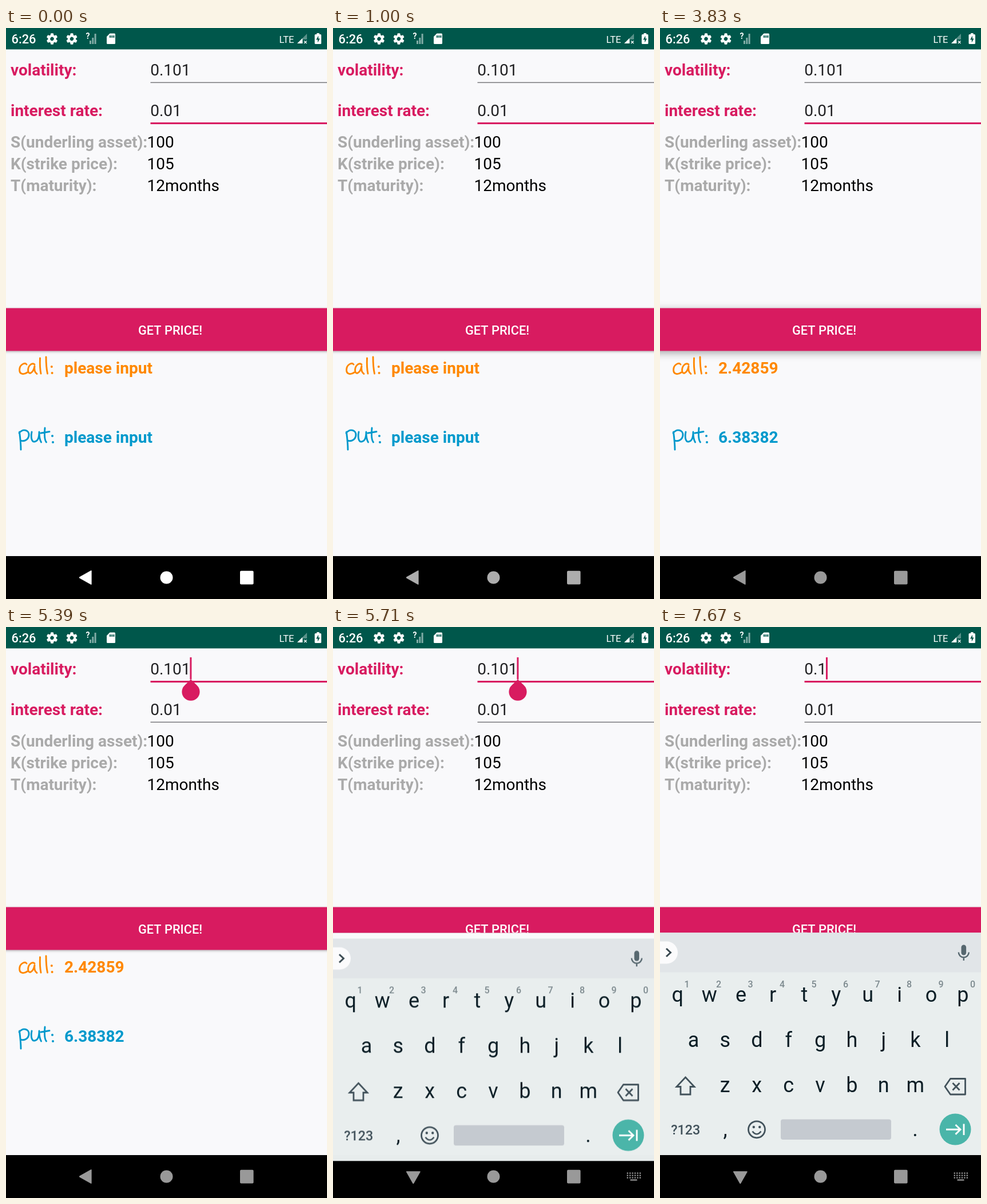
An HTML page with a canvas for the animation above (8 s loop, 561 by 998 pixels).

```html
<!DOCTYPE html>
<html lang="en">
<head>
<meta charset="utf-8">
<title>Option pricer</title>
<style>
html, body { margin: 0; width: 100%; height: 100%; overflow: hidden; background: #000; }
canvas { display: block; }
</style>
</head>
<body>
<canvas id="stage" width="561" height="998"></canvas>
<script>
const W = 561, H = 998, LOOP = 8000, NAV_Y = 923, FIT_Y = 534.5;
const PINK = '#d81b60', BG = '#f9f9fb', INK = '#0c1e26', ICON = '#42525b';
const screen = document.getElementById('stage').getContext('2d');
let g = screen;

const clamp = v => Math.min(1, Math.max(0, v));
const ramp = (t, a, b) => clamp((t - a) / (b - a));
const smooth = u => (1 - Math.cos(Math.PI * u)) / 2;
const within = (t, spans) => spans.some(([a, b]) => t >= a && t < b);

function rect(x, y, w, h, color) {
  g.fillStyle = color;
  g.fillRect(x, y, w, h);
}
function round(x, y, w, h, r, color) {
  g.fillStyle = color;
  g.beginPath();
  g.roundRect(x, y, w, h, r);
  g.fill();
}
function disc(x, y, r, color) {
  g.fillStyle = color;
  g.beginPath();
  g.arc(x, y, r, 0, 7);
  g.fill();
}
function text(str, x, y, size, color, weight = 400, align = 'left') {
  g.font = `${weight} ${size}px Roboto, sans-serif`;
  g.textAlign = align;
  g.fillStyle = color;
  g.fillText(str, x, y);
}
function fill(path, color) {
  g.fillStyle = color;
  g.fill(new Path2D(path), 'evenodd');
}
function stroke(path, color, width, cap = 'butt') {
  g.strokeStyle = color;
  g.lineWidth = width;
  g.lineCap = cap;
  g.lineJoin = cap === 'round' ? 'round' : 'miter';
  g.stroke(new Path2D(path));
}

function gear(cx, cy) {
  g.save();
  g.translate(cx, cy);
  g.fillStyle = '#fff';
  g.beginPath();
  g.arc(0, 0, 7, 0, 7);
  g.arc(0, 0, 3.2, 7, 0, true);
  g.fill();
  for (let i = 0; i < 6; i++) {
    g.rotate(Math.PI / 3);
    fill('M-3.2 -5.5L-2.1 -9.7H2.1L3.2 -5.5Z', '#fff');
  }
  g.restore();
}

function statusBar() {
  rect(0, 0, W, 37.4, '#00574b');
  text('6:26', 9.5, 26.5, 21.8, '#fff', 500);
  gear(80.5, 19);
  gear(115, 19);
  text('?', 139.5, 19, 14, '#fff', 700);
  [[146, 22], [150.3, 17], [154.6, 10]].forEach(([x, y]) =>
    rect(x, y, 3, 28 - y, 'rgba(255,255,255,.5)'));
  fill('M181.5 9.5H189.5Q191 9.5 191 11V26.5Q191 28 189.5 28H177.5Q176 28 176 26.5V15Z' +
    'M181 13h2v4h-2ZM184.2 13h2v4h-2ZM187.4 13h2v4h-2Z', '#fff');
  text('LTE', 477.5, 25.5, 16.5, '#fff');
  fill('M509 27L526 10V20H519V27Z', 'rgba(255,255,255,.35)');
  fill('M509 27L518 18V27Z', '#fff');
  stroke('M521 22.5L525.5 27M525.5 22.5L521 27', '#fff', 1.3);
  round(539.5, 11, 11.5, 17, 1.5, '#fff');
  rect(543, 9, 4.6, 3, '#fff');
  fill('M546 13.5L542 20.6H544.8V25.5L548.6 18.6H546Z', '#00574b');
}

function field(y, value, focused) {
  text(value, 252.2, y, 28, '#212123');
  if (focused) rect(252.5, y + 11, W, 3.1, PINK);
  else rect(252.5, y + 11.6, W, 1.5, '#77777a');
}
function cursor(y, value) {
  g.font = '400 28px Roboto, sans-serif';
  rect(252.2 + g.measureText(value).width - 1.1, y - 30, 3, 38.6, PINK);
}

function button(lift) {
  g.save();
  g.shadowColor = `rgba(0,0,0,${0.28 + 0.06 * lift})`;
  g.shadowBlur = 4 + 9 * lift;
  g.shadowOffsetY = 1.5 + 2 * lift;
  rect(-20, 489.6, W + 40, 74.8, PINK);
  g.restore();
  text('GET PRICE!', 287, 535.6, 21.8, '#fff', 500, 'center');
}

// Handwritten captions
function captions() {
  const orange = '#ff8800', blue = '#0099cc';
  stroke('M36 588C33 584 24 588 23.6 597C23 606 32 606 37 602' +
    'M50 588C44 584 38 592 38.6 599C39 606 47 605 50 591C49 598 50 602 54 604.5' +
    'M59.5 577C59 588 59.5 597 61 604M70 575C70 586 71 597 72.5 604', orange, 2.9, 'round');
  disc(79.8, 592, 2, orange);
  disc(80.6, 603, 2, orange);
  stroke('M23.5 706C25 718 26 728 26 737M23 708C30 699 41 703 40 712C39 721 30 723 26 721' +
    'M45 706C43 716 45 724 50 723C57 722 58 712 58 706C58 714 59 720 61.5 724' +
    'M68 699C67 710 67 720 70.5 724M61 708L76 705.5', blue, 2.9, 'round');
  disc(81, 713, 2, blue);
  disc(82, 724, 2, blue);
}

function content(t) {
  const onVol = t >= 5390, priced = t >= 3730;
  const vol = t < 6930 ? '0.101' : t < 7670 ? '0.10' : '0.1';
  g.save();
  g.beginPath();
  g.rect(0, 0, W, t >= 5560 ? FIT_Y : NAV_Y);
  g.clip();

  text('volatility:', 8, 83, 28, PINK, 700);
  text('interest rate:', 8, 154, 28, PINK, 700);
  field(83, vol, onVol);
  field(154, '0.01', !onVol);
  [['S(underling asset):', '100'], ['K(strike price):', '105'], ['T(maturity):', '12months']]
    .forEach(([label, value], i) => {
      text(label, 8, 209 + 38 * i, 28, '#aaaaaa', 700);
      text(value, 246.5, 209 + 38 * i, 28, '#000');
    });

  button(ramp(t, 3650, 3750) - ramp(t, 3840, 3940));
  captions();
  text(priced ? '2.42859' : 'please input', 102, 603.5, 28, '#ff8800', 700);
  text(priced ? '6.38382' : 'please input', 102, 725, 28, '#0099cc', 700);

  if (onVol) {
    if (!within(t, [[6410, 6930]])) cursor(83, vol);
    g.globalAlpha = 1 - ramp(t, 6930, 7190);
    fill('M323 91.5L334 102.2A15.6 15.6 0 1 1 312 102.2Z', PINK);
  } else if (within(t, [[1640, 2140], [2660, 3180], [3650, 3790], [4680, 5170]])) {
    cursor(154, '0.01');
  }
  g.restore();
}

function keyRow(keys, x, y) {
  [...keys].forEach((k, i) => text(k, x + 55.4 * i, y, 36, INK, 400, 'center'));
}
function drawKeyboard() {
  rect(0, FIT_Y, W, NAV_Y - FIT_Y, '#e9eeee');
  rect(0, FIT_Y, W, 69, '#e1e5e8');
  round(-30, 549.5, 61, 39, 19.5, '#fbfbfc');
  stroke('M11 562L18.5 569L11 576', '#37474f', 3);

  round(526.5, 555.5, 8.6, 18, 4.3, '#56676f');
  stroke('M521.8 568.5A9 9 0 0 0 539.8 568.5M530.8 577.5V583', '#56676f', 2.4);

  keyRow('qwertyuiop', 30.8, 655);
  keyRow('asdfghjkl', 58.5, 733.5);
  keyRow('zxcvbnm', 113.8, 812.5);
  [...'1234567890'].forEach((d, i) =>
    text(d, 47 + 55.5 * i, 630, 16, '#7c898e', 500, 'center'));

  stroke('M44.5 787L60 803.5H53V817H36V803.5H29Z', ICON, 2.8);
  stroke('M507.5 789.5H533.5V817H507.5L498 803.2Z', ICON, 2.8, 'round');
  stroke('M511.5 797L523.5 809.5M523.5 797L511.5 809.5', ICON, 2.8);

  text('?123', 44.7, 886.5, 23.3, ICON, 500, 'center');
  text(',', 114, 889.5, 36, INK, 400, 'center');
  text('.', 446, 889.5, 36, INK, 400, 'center');
  stroke('M154.5 878.3A14.5 14.5 0 1 1 183.5 878.3A14.5 14.5 0 1 1 154.5 878.3Z', ICON, 2.8);
  disc(163.8, 874, 2.2, ICON);
  disc(174.2, 874, 2.2, ICON);
  stroke('M161.5 881.5Q169 891 176.5 881.5', ICON, 2.6);
  round(211, 860.5, 193, 35.5, 4, '#c5cad0');
  disc(516, 878, 27.5, '#4ab5a9');
  stroke('M500 878.3H524M516.5 870L525 878.3L516.5 886.6M531 868.5V888', '#fff', 2.9);
}

const sheet = document.createElement('canvas');
sheet.width = W;
sheet.height = H;
g = sheet.getContext('2d');
drawKeyboard();
g = screen;

function keyboard(t) {
  if (t < 5575) return;
  const drop = 120 * Math.pow(1 - ramp(t, 5575, 5925), 5);
  g.globalAlpha = 1 - Math.pow(1 - ramp(t, 5575, 5745), 3);
  g.drawImage(sheet, 0, drop < 0.3 ? 0 : drop);
  g.globalAlpha = 1;
}

function navButtons(t) {
  const typing = t >= 5560, white = '#fff';
  g.save();
  g.globalAlpha = 1 - 0.4 * smooth(ramp(t, -60, 1440));
  g.save();
  g.translate(140.3, 960.5);
  if (typing) g.rotate(-Math.PI / 2);
  fill('M-12 -1Q-13 0 -12 1L8 12.3Q9.3 12.8 9.3 11.2V-11.2Q9.3 -12.8 8 -12.3Z', white);
  g.restore();
  disc(280.5, 960.5, 11, white);
  round(409, 948.8, 23.6, 23.6, 2, white);
  if (typing) {
    for (let r = 0; r < 3; r++)
      for (let c = 0; c < 6; c++) rect(513.6 + 4.4 * c, 953.5 + 4 * r, 2.4, 2.2, white);
    rect(519.5, 965.4, 12, 2.2, white);
  }
  g.restore();
}

function draw(t) {
  rect(0, 0, W, H, BG);
  content(t);
  statusBar();
  rect(0, NAV_Y, W, H - NAV_Y, '#000');
  keyboard(t);
  navButtons(t);
}

const start = performance.now();
function tick() {
  draw((performance.now() - start) % LOOP);
  requestAnimationFrame(tick);
}
tick();
</script>
</body>
</html>
```
